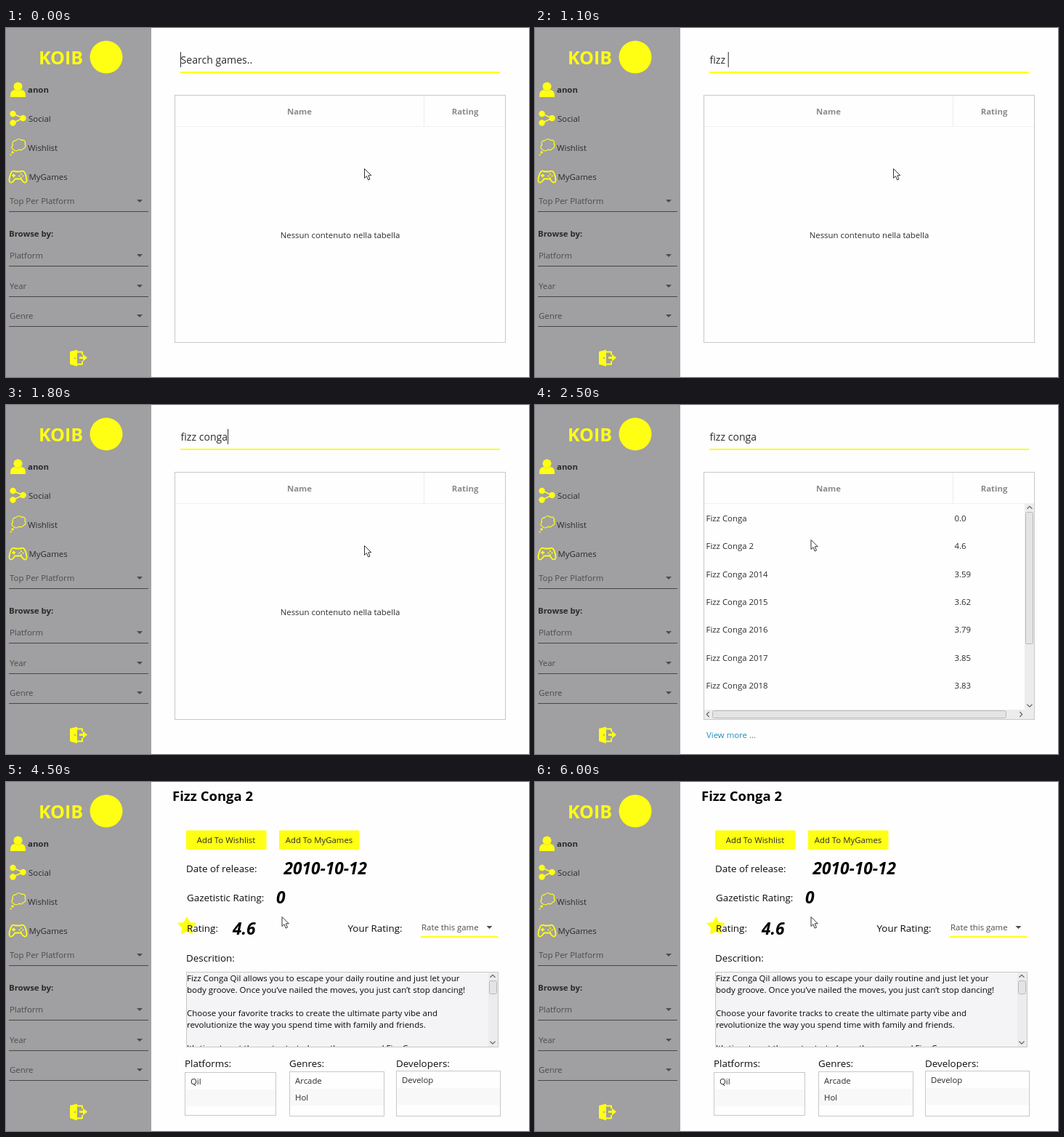
An HTML page for the animation above (6.1 s loop, 720x480 px).

```html
<!DOCTYPE html>
<html lang="en">
<head>
<meta charset="utf-8">
<style>
  html, body { margin: 0; width: 100%; height: 100%; overflow: hidden; background: #fefefe; }
  svg { display: block; font: 11.4px "Open Sans", sans-serif; fill: #2b2b2b; }
  text { white-space: pre; }
  .bold { font-weight: 700; }
  .logo { font-size: 25px; }
  .title { font: 700 18.5px "Open Sans", sans-serif; fill: #000; }
  .head { font-weight: 700; fill: #8a8a8a; text-anchor: middle; }
  .mid { text-anchor: middle; }
  .soft { fill: #4c4c4c; }
  .link { fill: #1c8fb8; }
  .label { font-size: 13.4px; fill: #0c0c0c; }
  .value { font: italic 700 22.7px "Open Sans", sans-serif; fill: #000; }
  .body { font-size: 11.53px; fill: #080808; }
  .search { font-size: 14.1px; }
  .yellow { fill: #ffff14; }
  .line { fill: none; stroke: #ffff14; stroke-width: 1.8; stroke-linejoin: round; }
  .thin { stroke-width: 1.2; }
  .star { stroke: #ffff14; stroke-width: 2; stroke-linejoin: round; }
  .box { fill: #fefefe; stroke: #c8c8c8; }
  .thumb { fill: #e4e3e5; stroke: #b9b9b9; }
  .chevron { fill: none; stroke: #666; stroke-width: 1.2; }
</style>
</head>
<body>
<svg width="720" height="480" viewBox="0 0 720 480"></svg>
<script>
const LOOP = 6100, TYPE_START = 450, KEY_TIME = 150;
const RESULTS = 2000, CLICK = 3300, DETAIL = 3700;
const NAME = "Fizz Conga", QUERY = NAME.toLowerCase();

const text = (x, y, s, cls = "") => `<text x="${x}" y="${y}" class="${cls}">${s}</text>`;
const rect = (x, y, w, h, attrs) => `<rect x="${x}" y="${y}" width="${w}" height="${h}" ${attrs}/>`;
const fill = color => `fill="${color}"`;
const path = (d, cls) => `<path d="${d}" class="${cls}"/>`;
const dot = (x, y, r) => `<circle cx="${x}" cy="${y}" r="${r}" class="yellow"/>`;
const arrow = (x, y) => path(`M${x - 4} ${y - 2}h8l-4 4z`, "soft");
const vChevron = (x, y, d) => path(`M${x - 3.5} ${y + d}l3.5 ${-2 * d}l3.5 ${2 * d}`, "chevron");
const hChevron = (x, y, d) => path(`M${x + d} ${y - 3.5}l${-2 * d} 3.5l${2 * d} 3.5`, "chevron");
const group = (id, ...parts) => `<g id="${id}">${parts.join("")}</g>`;

const dropdown = (label, y) =>
  text(5, y + 4, label, "soft") + arrow(184, y) + rect(4, y + 14, 192, 1, fill("#484848"));

const button = (x, label) =>
  rect(x, 66.5, 110.5, 26.5, 'rx="1" class="yellow"') + text(x + 55, 84, label, "mid");

const list = (x, y, w, h, title, items) =>
  text(x, 392, title, "label") + rect(x + .5, y + .5, w, h, 'class="box"') +
  rect(x + 1, y + 24, w - 1, 23, fill("#f8f8f8")) +
  items.map((s, i) => text(x + 8, y + 16.5 + i * 23.5, s)).join("");

const star = Array.from({ length: 10 }, (_, i) => {
  const r = i % 2 ? 6 : 12, a = i * Math.PI / 5;
  return `${249 + r * Math.sin(a)} ${198.5 - r * Math.cos(a)}`;
}).join("L");

const sidebar = group("sidebar",
  rect(0, 0, 200, 480, fill("#a09fa1")),
  text(45, 50, "KOIB", "bold yellow logo"),
  dot(138, 40, 22.5),
  dot(16.5, 80.5, 6),
  path("M6 95v-3q0-6 6-7q4.500 3 9 0q6 1 6 7v3z", "yellow"),
  dot(9.5, 118, 4.2), dot(23.5, 124, 4.2), dot(9.5, 130.5, 4.2),
  path("M9.5 118L23.5 124L9.5 130.5", "line"),
  path("M10 167a3.5 3.5 0 0 1-.5-6a4 4 0 0 1 4-6a5 5 0 0 1 8-.5a3.5 3.5 0 0 1 4.5 5a3.5 3.5 0 0 1-2 6a4 4 0 0 1-6 1.5a5 5 0 0 1-8 0z", "line thin"),
  dot(9, 171, 1.7), dot(6.5, 174.5, 1.1),
  path("M9 197q2-1 4 .5h7q2-1.5 4-.5q3 2 4.5 11q.5 5-3 4.5q-2-.5-5-5h-8q-3 4.5-5 5q-3.5.5-3-4.5q1.5-9 4.5-11z", "line"),
  path("M8 203h5M10.5 200.5v5", "line"),
  dot(21, 201, 1.1), dot(23.5, 203.5, 1.1), dot(21, 206, 1.1), dot(18.5, 203.5, 1.1),
  text(30, 89, "anon", "bold"), text(31, 129, "Social"),
  text(30, 169, "Wishlist"), text(31.5, 209, "MyGames"),
  dropdown("Top Per Platform", 238),
  text(4, 287, "Browse by:", "bold"),
  dropdown("Platform", 313), dropdown("Year", 355), dropdown("Genre", 396),
  path("M88 445l10-2.5v23l-10-3z", "yellow"),
  `<circle cx="95" cy="454" r="1" fill="#a09fa1"/>`,
  path("M98 445.5h7v4M105 458v4.5h-7", "line"),
  path("M101 452h5v-3.5l6 5l-6 5v-3.5h-5z", "yellow"));

const ratings = ["0.0", "4.6", "3.59", "3.62", "3.79", "3.85", "3.83"];
const rows = ratings.map((rating, i) => {
  const y = 160 + i * 38.35;
  const suffix = i == 0 ? "" : i == 1 ? " 2" : ` ${2012 + i}`;
  return text(235.5, y, NAME + suffix) + text(577.5, y, rating);
}).join("");

const searchPage = group("searchPage",
  group("focusLine", rect(240, 60, 440, 2, 'class="yellow"')),
  group("blurLine", rect(240, 61, 440, 1, fill("#505050"))),
  `<text id="query" x="240.5" y="49" class="search"></text>`,
  rect(0, 33, 1, 21, 'id="caret"'),
  rect(232.5, 92.5, 455, 340, 'class="box"'),
  rect(233, 135, 454, 1, fill("#f0f0f0")), rect(575, 93, 1, 42, fill("#ececec")),
  text(404, 118.5, "Name", "head"), text(632, 118.5, "Rating", "head"),
  group("empty", text(460, 289, "Nessun contenuto nella tabella", "mid")),
  group("results",
    rect(233, 175, 441, 38, `id="selected" ${fill("#b7bddf")}`), rows,
    rect(674, 136, 13, 283, fill("#ececec")), rect(233, 419, 454, 13, fill("#ececec")),
    rect(675.5, 147.5, 10, 181, 'rx="2" class="thumb"'),
    rect(244.5, 420.5, 404, 10, 'rx="2" class="thumb"'),
    vChevron(681, 141, 1.7), vChevron(681, 413.5, -1.7),
    hChevron(238, 425.5, 1.7), hChevron(669, 425.5, -1.7),
    text(236, 457.5, "View more ...", "link")));

const description = [
  [274, `${NAME} Qil allows you to escape your daily routine and just let your`],
  [290, "body groove. Once you’ve nailed the moves, you just can’t stop dancing!"],
  [322, "Choose your favorite tracks to create the ultimate party vibe and"],
  [338, "revolutionize the way you spend time with family and friends."],
  [370, `It’s time to get the party started now than ever and ${NAME}`]
].map(([y, s]) => text(249, y, s, "body")).join("");

const detailPage = group("detailPage",
  text(229, 25.5, NAME + " 2", "title"),
  button(248, "Add To Wishlist"), button(376, "Add To MyGames"),
  text(248, 124, "Date of release:", "label"), text(382.5, 127, "2010-10-12", "value"),
  text(249, 163.5, "Gazetistic Rating:", "label"), text(372, 166.5, "0", "value"),
  path(`M${star}z`, "yellow star"),
  text(249, 205.5, "Rating:", "label"), text(312, 209.5, "4.6", "value"),
  text(470.5, 206, "Your Rating:", "label"), text(572, 204, "Rate this game", "soft"),
  arrow(665.5, 200), rect(571, 212, 106, 2, 'class="yellow"'),
  text(248, 247, "Descrition:", "label"),
  rect(248.5, 261.5, 429, 103, `${fill("#f4f3f5")} stroke="#c8c8c8"`),
  `<clipPath id="area">${rect(248, 261, 416, 103, "")}</clipPath>`,
  `<g clip-path="url(#area)">${description}</g>`,
  rect(664, 262, 13, 102, fill("#ececec")),
  rect(665.5, 273.5, 10, 18, 'rx="2" class="thumb"'),
  vChevron(670, 267, 1.7), vChevron(670, 358.5, -1.7),
  list(246, 399, 125, 59, "Platforms:", ["Qil"]),
  list(390, 398, 130, 61, "Genres:", ["Arcade", "Hol"]),
  list(537, 397, 143, 62, "Developers:", ["Develop"]));

const pointer = `<path id="pointer" d="M0 0v13l3-2.8l2.2 5.3l2.3-1l-2.2-5.2h4z" fill="#fff" stroke="#333"/>`;

document.querySelector("svg").innerHTML = sidebar + searchPage + detailPage + pointer;

const el = id => document.getElementById(id);
const show = (id, on) => { el(id).style.display = on ? "" : "none"; };

function caretOn(t) {
  const typingEnd = TYPE_START + KEY_TIME * QUERY.length;
  return t < CLICK && (t < typingEnd || Math.floor((t - typingEnd + 150) / 500) % 2 == 0);
}

function draw() {
  const t = performance.now() % LOOP;
  const typed = Math.max(0, Math.min(QUERY.length, Math.floor((t - TYPE_START) / KEY_TIME) + 1));
  const query = el("query");
  query.textContent = typed ? QUERY.slice(0, typed) : "Search games..";

  show("searchPage", t < DETAIL);
  show("detailPage", t >= DETAIL);
  show("empty", t < RESULTS);
  show("results", t >= RESULTS);
  show("selected", t >= CLICK);
  show("focusLine", t < CLICK);
  show("blurLine", t >= CLICK);
  show("caret", caretOn(t));
  el("caret").setAttribute("x", typed ? 240.5 + query.getComputedTextLength() : 240);

  const p = Math.max(0, Math.min(1, (t - 2100) / 380));
  const ease = p * p * (3 - 2 * p);
  el("pointer").setAttribute("transform", `translate(${493.5 - 113.5 * ease} ${193.5 - 8 * ease})`);
  requestAnimationFrame(draw);
}
draw();
</script>
</body>
</html>
```
